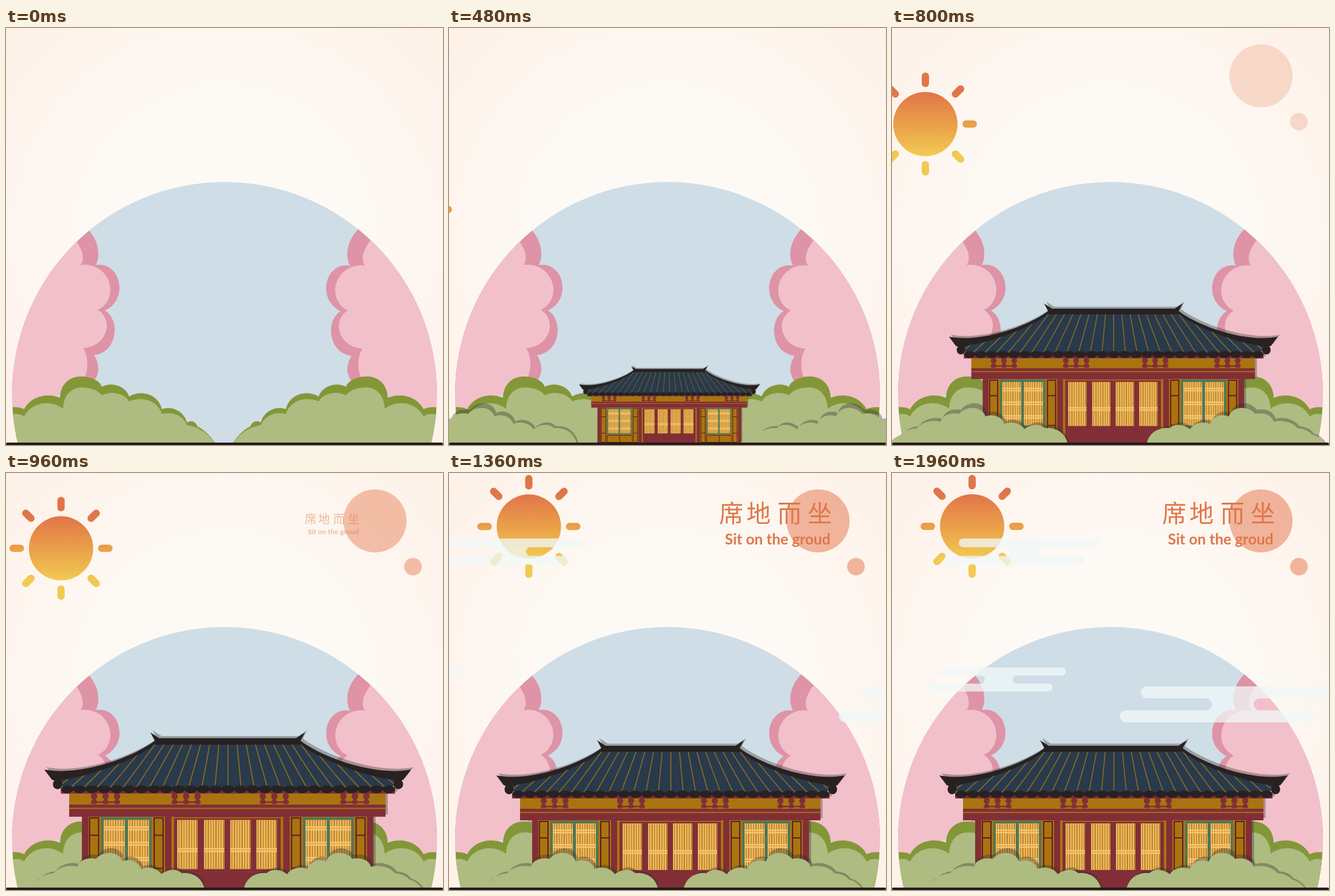
These frames come from a looping animation (720x688 px, 2 s). An HTML page with a canvas:

```html
<!DOCTYPE html>
<html lang="zh">
<head>
<meta charset="utf-8">
<style>
  html, body { margin: 0; width: 100%; height: 100%; overflow: hidden; background: #fef4ec; }
  canvas { display: block; }
</style>
</head>
<body>
<canvas id="stage" width="720" height="688"></canvas>
<script>
const ctx = document.getElementById('stage').getContext('2d');
const LOOP = 2000, STEP = 40;
const BLACK = '#282122', RED = '#822e37', GOLD = '#a97410', DARK_RED = '#601d24', GREEN = '#4f7658';
const LEAF = '#aebb81', SHADE = 'rgba(50,52,45,.36)';

const sky = new Path2D();
sky.arc(360, 604, 350, 0, 7);

const treeBack = new Path2D(`M122,320 C155,345 156,375 148,391 C170,387 187,405 187,429
  C187,447 176,460 163,466 C174,472 180,488 179,501 C177,525 163,537 145,540
  C151,548 154,562 151,570 Q149,578 143,584 L0,610 V320Z`);
const treeFront = new Path2D(`M100,334 C127,360 131,380 123,391 C147,387 172,405 172,432
  C172,448 162,461 151,465 C162,471 167,484 166,494 C164,513 148,527 127,528
  C134,538 136,555 132,570 Q128,585 100,600 L0,640 V334Z`);

const hedgeBack = new Path2D(`M0,627 Q20,623 30,629 C40,608 68,601 89,610 C90,585 107,575 123,575
  C142,575 155,583 158,592 C172,584 196,589 203,608 C220,597 250,602 257,629
  C275,622 295,635 298,651 C305,646 313,650 315,657 Q331,665 344,684 H0Z`);
const hedgeFront = new Path2D(`M0,640 Q20,633 30,641 C40,620 70,611 94,628 C95,605 108,593 125,593
  C140,593 152,598 158,606 C172,598 195,602 203,616 C225,607 250,615 257,637
  C275,632 292,640 298,655 Q327,660 343,684 H0Z`);

const bush = new Path2D(`M52,684 Q60,672 72,669 Q80,658 96,657 C104,645 122,641 135,645
  C138,632 152,627 166,630 C176,615 203,614 209,635 C222,629 237,636 240,649
  C252,643 268,648 273,659 C283,650 298,647 307,657 C328,655 340,668 344,684Z`);

const roof = new Path2D(`M244,441 L258,450 H472 L486,441 L479,454 C513,480 595,510 652,499
  L640,515 L628,519 L618,531 H112 L102,519 L90,515 L78,499 C135,510 217,480 251,454Z`);
const tiles = new Path2D('M250,460 H480 C510,484 580,510 629,516 L622,527 H108 L101,516 C150,510 220,484 250,460Z');
const silhouette = new Path2D(roof);
silhouette.rect(104, 531, 523, 6);
silhouette.rect(117, 537, 495, 36);
silhouette.rect(137, 573, 456, 111);

const cloud = new Path2D(`M6.6,0 H205 a6.6,6.6 0 0 1 0,13.2 H130.5 a6.6,6.6 0 0 0 0,13.2 H183
  a6.6,6.6 0 0 1 0,13.2 H-16.4 a6.6,6.6 0 0 1 0,-13.2 H71.5 a6.6,6.6 0 0 0 0,-13.2 H6.6
  a6.6,6.6 0 0 1 0,-13.2Z`);

// Smooth interpolation through [time, value] pairs.
function track(t, keys) {
  const n = keys.length - 1;
  if (t <= keys[0][0]) return keys[0][1];
  if (t >= keys[n][0]) return keys[n][1];
  const slope = i => (keys[i + 1][1] - keys[i][1]) / (keys[i + 1][0] - keys[i][0]);
  const tangent = i => {
    if (i === 0) return slope(0);
    if (i === n) return 0;
    const a = slope(i - 1), b = slope(i);
    return a * b <= 0 ? 0 : 2 * a * b / (a + b);
  };
  const i = keys.findIndex(k => k[0] > t) - 1;
  const [t0, v0] = keys[i], [t1, v1] = keys[i + 1];
  const h = t1 - t0, u = (t - t0) / h, w = 1 - u;
  return v0 * w * w * (1 + 2 * u) + tangent(i) * h * u * w * w
       + v1 * u * u * (3 - 2 * u) - tangent(i + 1) * h * u * u * w;
}

function at(x, y, sx, sy, draw) {
  ctx.save();
  ctx.translate(x, y);
  ctx.scale(sx, sy);
  draw();
  ctx.restore();
}
function fill(path, color) {
  ctx.fillStyle = color;
  ctx.fill(path);
}
function box(x, y, w, h, color) {
  ctx.fillStyle = color;
  ctx.fillRect(x, y, w, h);
}
function oval(x, y, rx, ry, color) {
  ctx.fillStyle = color;
  ctx.beginPath();
  ctx.ellipse(x, y, rx, ry, 0, 0, 7);
  ctx.fill();
}
function line(x1, y1, x2, y2, color, width) {
  ctx.strokeStyle = color;
  ctx.lineWidth = width;
  ctx.beginPath();
  ctx.moveTo(x1, y1);
  ctx.lineTo(x2, y2);
  ctx.stroke();
}

function backdrop() {
  const g = ctx.createRadialGradient(360, 344, 60, 360, 344, 500);
  g.addColorStop(0, '#fdfaf5');
  g.addColorStop(.35, '#fdf9f4');
  g.addColorStop(1, '#fef1e8');
  box(0, 0, 720, 688, g);
}

function garden() {
  ctx.save();
  ctx.beginPath();
  ctx.rect(0, 0, 720, 684);
  ctx.clip();
  ctx.clip(sky);
  box(0, 250, 720, 440, '#cfdde6');
  const trees = () => { fill(treeBack, '#de93a7'); fill(treeFront, '#f2c0ca'); };
  const hedge = () => { fill(hedgeBack, '#839738'); fill(hedgeFront, LEAF); };
  at(0, 0, 1, 1, trees);
  at(714.5, 1, -1, 1, trees);
  at(0, 0, 1, 1, hedge);
  at(718, 0, -1, 1, hedge);
  ctx.restore();
}

function lattice(x, y, w, h, bands) {
  box(x, y, w, h, '#efba5e');
  for (let i = 2; i < w; i += 4) box(x + i, y, 1.4, h, i % 3 ? '#b98127' : '#a06d1c');
  for (const b of bands) {
    box(x, b, w, 2.5, '#f5c56f');
    box(x, b + 4, w, 2.5, '#f5c56f');
  }
}

function panel(x) {
  box(x, 574, 16, 110, DARK_RED);
  box(x + 2, 576, 12, 25, GOLD);
  box(x + 2, 603, 12, 50, GOLD);
  box(x + 2, 655, 12, 27, GOLD);
}

function greenWindow(x) {
  box(x, 574, 79, 84, GREEN);
  for (const dx of [4, 42]) lattice(x + dx, 578, 33, 76, [588, 612, 636]);
  box(x - 1, 660, 81, 24, DARK_RED);
  box(x + 1, 662, 38, 20, GOLD);
  box(x + 41, 662, 38, 20, GOLD);
}

function bracket(x) {
  box(x - 20, 549, 40, 2.5, RED);
  for (const dx of [-18, 0, 18]) {
    box(x + dx - 4, 535, 8, 3, RED);
    oval(x + dx, 541, 5, 5, RED);
    box(x + dx - 2.5, 544, 5, 7, RED);
    oval(x + dx, 550, 5, 3.5, RED);
  }
}

function house() {
  at(3.5, -3.5, 1, 1, () => fill(silhouette, SHADE));

  box(137, 573, 456, 111, GOLD);
  for (const x of [137, 267, 452, 583]) box(x, 573, 10, 111, RED);
  for (const x of [148, 249, 464, 565]) panel(x);
  greenWindow(167);
  greenWindow(483);
  box(281, 573, 167, 111, RED);
  box(281, 574, 167, 1.5, GOLD);
  for (const x of [286, 328, 369, 410]) lattice(x, 578, 32, 77, [622]);

  box(104, 530, 523, 7, RED);
  box(117, 537, 495, 18, GOLD);
  box(117, 554, 495, 19, RED);
  box(117, 559, 495, 1.8, GOLD);
  for (const x of [174, 300, 438, 564]) bracket(x);

  fill(roof, BLACK);
  fill(tiles, '#283a4b');
  ctx.save();
  ctx.clip(tiles);
  for (let i = -13; i <= 13; i++) line(365.5 + 14.2 * i, 459, 365.5 + 20.5 * i, 527, '#8c6b22', 1.6);
  ctx.restore();
  oval(99, 522, 7.5, 8, BLACK);
  oval(632, 522, 7.5, 8, BLACK);
  for (let i = 0; i < 27; i++) oval(114 + 19.35 * i, 530, 10, 6, BLACK);
}

// The leaves sit a little lower than their shadow.
function frontBush(x, flip) {
  at(x + 3, 684, flip, 1, () => { ctx.translate(0, -684); fill(bush, SHADE); });
  at(x, 684, flip, .88, () => { ctx.translate(0, -684); fill(bush, LEAF); });
}

function sun(x, y) {
  at(x, y, 1, 1, () => {
    const g = ctx.createLinearGradient(0, -53, 0, 53);
    g.addColorStop(0, '#e0754a');
    g.addColorStop(.5, '#ea9f49');
    g.addColorStop(1, '#f1ca54');
    oval(0, 0, 53, 53, g);
    ctx.lineCap = 'round';
    for (let i = 0; i < 8; i++) {
      const c = Math.cos(i * Math.PI / 4), s = Math.sin(i * Math.PI / 4);
      const r = i % 2 ? 70 : 67;
      line(r * c, r * s, (r + 12) * c, (r + 12) * s, g, 12);
    }
    ctx.lineCap = 'butt';
  });
}

function title(t) {
  ctx.globalAlpha = .5 * track(t, [[600, 0], [640, .1], [800, .46], [1050, 1]]);
  oval(608, 79, 52, 52, '#e3754a');
  oval(670.5, 154.5, 14.5, 14.5, '#e3754a');

  const grow = track(t, [[820, 0], [1160, .98], [1240, 1]]);
  ctx.globalAlpha = grow;
  at(537, 84, grow, grow, () => {
    ctx.fillStyle = '#df774a';
    ctx.textAlign = 'center';
    ctx.font = '500 40px "Noto Sans CJK SC", "Noto Sans CJK", sans-serif';
    [...'席地而坐'].forEach((ch, i) => ctx.fillText(ch, [-72, -27, 24, 74][i], -3));
    ctx.font = '700 24.5px Lato, sans-serif';
    ctx.fillText('Sit on the groud', 4.5, 34);
  });
  ctx.globalAlpha = 1;
}

function clouds(t) {
  const white = 'rgba(241,248,248,.75)';
  const puff = (x, y, s) => at(x, y, s, s, () => fill(cloud, white));
  puff(110 + track(t, [[1040, -355], [1160, -278], [1400, -90], [1560, 0]]), 108, 1.09);
  const drift = .445 * (1960 - Math.min(t, 1960));
  puff(75 - drift, 321, 1);
  puff(410 + drift, 352, 1.5);
}

function draw(t) {
  backdrop();
  garden();

  const size = track(t, [[0, 0], [320, .308], [640, .744], [800, .944], [1000, 1.06], [1160, 1.04], [1360, 1]]);
  if (size > 0) at(361, 684, size, size, () => { ctx.translate(-361, -684); house(); });

  frontBush(track(t, [[0, -350], [320, -181], [640, -95], [800, -55], [1100, 0]]), 1);
  frontBush(731 + track(t, [[0, 350], [320, 165], [640, 75], [800, 33], [1040, 0]]), -1);

  sun(track(t, [[400, -130], [560, -33], [640, 5], [800, 55], [1160, 120.5], [1400, 132]]),
      track(t, [[400, 350], [560, 252], [640, 214], [800, 158.5], [1160, 97.5], [1400, 88]]));
  title(t);
  clouds(t);

  ctx.fillStyle = '#231c1e';
  ctx.beginPath();
  ctx.roundRect(0, 684, 720, 4, 2);
  ctx.fill();
}

const start = performance.now();
function frame() {
  const t = (performance.now() - start) % LOOP;
  draw(Math.floor(t / STEP) * STEP);
  requestAnimationFrame(frame);
}
frame();
</script>
</body>
</html>
```
